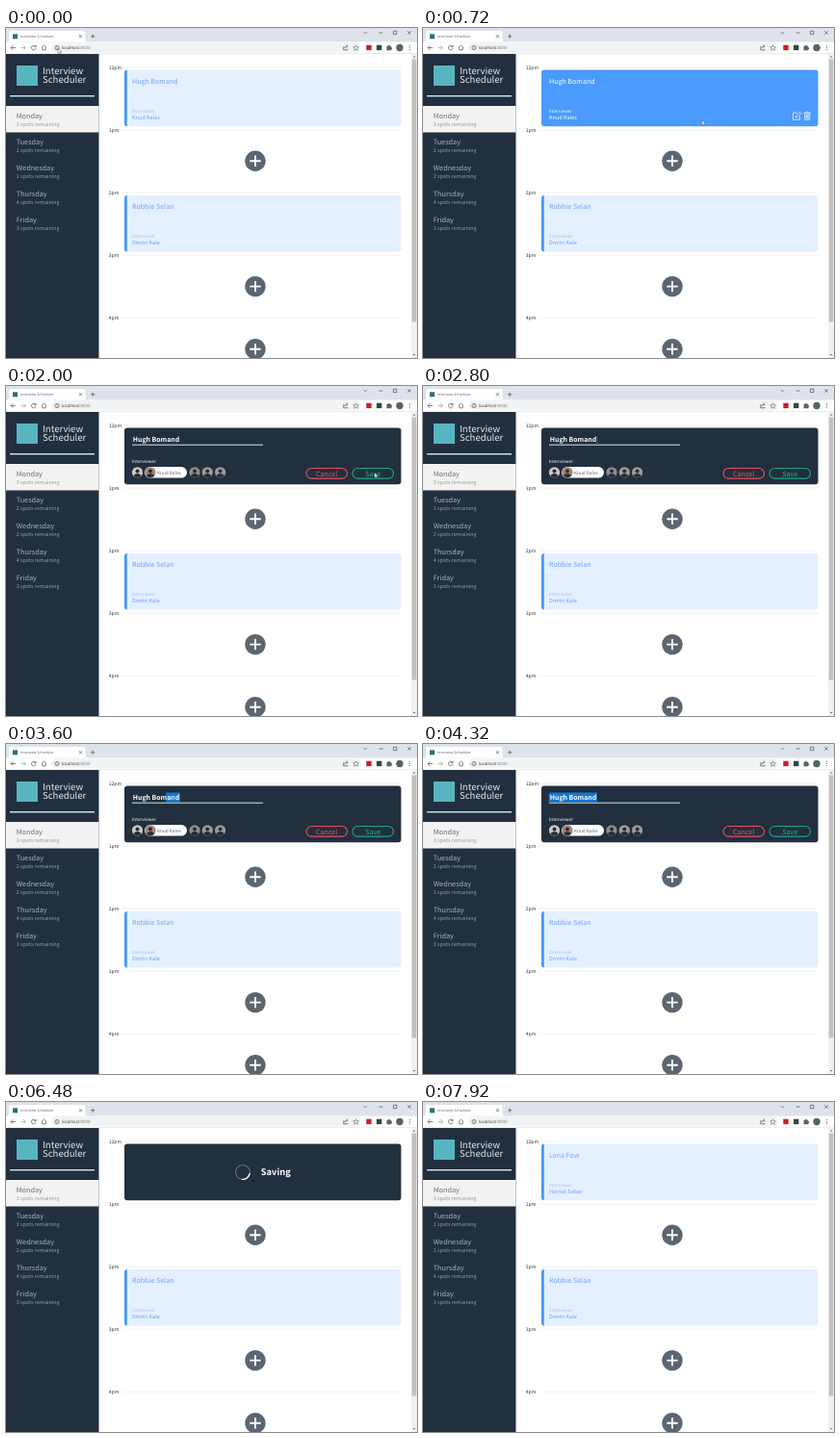
Animation, 427 px wide and 343 px high, one loop 8 s. Source, as an HTML page:

```html
<!DOCTYPE html>
<html lang="en">
<head>
<meta charset="utf-8">
<title>Interview Scheduler</title>
<style>
@property --f { syntax: '<integer>'; inherits: true; initial-value: 0; }
html, body { margin: 0; width: 100%; height: 100%; overflow: hidden; background: #fff; }
svg {
  display: block; width: 100%; height: 100%;
  font-family: "Noto Sans CJK JP", "Noto Sans CJK SC", "Noto Sans", sans-serif;
  text-rendering: geometricPrecision;
  animation: tick 8s steps(100) infinite;
}
text { white-space: pre; }

/* --f counts 80 ms steps; .on shows an element from step --a up to --b */
@keyframes tick { from { --f: 0; } to { --f: 100; } }
.on {
  --v: min(clamp(0, var(--f) - var(--a) + 1, 1), clamp(0, var(--b) - var(--f), 1));
  opacity: var(--v);
}
tspan.on { opacity: 1; fill-opacity: var(--v); }

.ui { font-family: "Open Sans", "Noto Sans", sans-serif; }
.line { fill: none; stroke: #5f6368; stroke-width: .8; }
.logo { font-size: 9.6px; font-weight: 300; fill: #e3e7ec; }
.day { font-size: 7.3px; fill: #a5b1c2; }
.spots { font-size: 5.45px; fill: #8e9bad; }
.now .day { fill: #6b7078; }
.now .spots { fill: #999ca1; }
.hour { font-size: 5px; fill: #333; }
.rule { stroke: #efefef; stroke-width: .8; }
.name { font-size: 7.1px; fill: #75a3f6; }
.label { font-size: 4.5px; fill: #a9bbfa; }
.who { font-size: 5.55px; fill: #6c9dfa; }
.hot text { fill: #fff; }
.icon { fill: none; stroke: #e8f2ff; stroke-width: .8; stroke-linejoin: round; stroke-linecap: round; }
.dark { fill: #222f3e; }
.input { font-size: 6.9px; font-weight: 700; fill: #fff; }
.pick { font-size: 4.75px; fill: #666; }
.btn { font-size: 7.1px; text-anchor: middle; }
.btn rect { fill: none; stroke-width: 1.1; }
.red text { fill: #f0525c; } .red rect { stroke: #e8505b; }
.green text { fill: #1fb894; } .green rect { stroke: #1aa886; }

.select { transform-origin: 181px 55px; animation: drag 8s steps(1) infinite; }
@keyframes drag {
  0% { transform: scaleX(0); } 45% { transform: scaleX(.3); }
  46% { transform: scaleX(.6); } 47% { transform: scaleX(.85); }
  48%, 100% { transform: scaleX(1); }
}
.spin { transform: translate(246px, 73px) rotate(calc(var(--f) * 29deg)); }
.cursor { animation: move 8s infinite ease-in-out; }
@keyframes move {
  0%, 2% { transform: translate(54px, 21px); }
  10%, 15% { transform: translate(297px, 98px); }
  20%, 24% { transform: translate(388px, 91px); }
  33%, 44% { transform: translate(181px, 56px); }
  48%, 62% { transform: translate(131px, 56px); }
  67%, 71% { transform: translate(140px, 90px); }
  76%, 100% { transform: translate(381px, 91px); }
}
</style>
</head>
<body>
<svg viewBox="0 0 427 343" preserveAspectRatio="none">
<defs>
  <g id="plus">
    <circle r="10.7" fill="#5c6670"/>
    <path d="M-5.7 0H5.7M0 -5.7V5.7" stroke="#fff" stroke-width="1.9"/>
  </g>
  <g id="face">
    <circle r="5.6" fill="currentColor"/>
    <g fill="#2b2d31">
      <circle cy="-1.2" r="2"/>
      <path d="M-4 3.8C-3.4 .4 3.4 .4 4 3.8A5.6 5.6 0 0 1 -4 3.8Z"/>
    </g>
  </g>
  <g id="pale">
    <path d="M123 46.5a3 3 0 0 1 3-3H407.5a3 3 0 0 1 3 3V99.2a3 3 0 0 1-3 3H126a3 3 0 0 1-3-3Z" fill="#e4f0fe"/>
    <path d="M125.8 43.5a2.8 3 0 0 0-2.8 3V99.2a2.8 3 0 0 0 2.8 3Z" fill="#4499f8"/>
  </g>
  <rect id="panel" x="123" y="43.5" width="287.5" height="58.7" rx="3"/>
</defs>

<rect width="427" height="343" fill="#fff"/>

<!-- browser frame -->
<g class="ui">
  <rect width="427" height="14.5" fill="#dee2ea"/>
  <path d="M1 14.5q2 0 2-2V5q0-2 2-2H80.500q2 0 2 2v7.500q0 2 2 2Z" fill="#fff"/>
  <rect x="7" y="6.300" width="5" height="5" fill="#2d6f7c"/>
  <text x="15" y="10.200" font-size="3.800" fill="#6a6470">Interview Scheduler</text>
  <g class="line">
    <path d="M76 7.200l3 3m0-3l-3 3M88 8.700h4.400m-2.200-2.200v4.400"/>
    <path d="M371.800 4.200l1.600 1.600 1.600-1.600M387.500 5h4M402.500 3.200h3.400v3.400h-3.400ZM417.300 3.200l3.400 3.400m0-3.400l-3.400 3.400"/>
    <path d="M10 20.500H5m2.300-2.300L5 20.500l2.300 2.300"/>
    <path d="M15.500 20.500h5m-2.300-2.300l2.300 2.300-2.300 2.300" stroke="#a9abaf"/>
    <path d="M30.700 19.200A2.300 2.300 0 1 0 31 21M31.100 17.700v1.900h-1.900"/>
    <path d="M37 20.300l2.500-2.300 2.500 2.300M37.800 20v2.800h3.400V20"/>
  </g>
  <rect x="47" y="15.300" width="322" height="10.300" rx="5.100" fill="#f1f3f4"/>
  <g class="line">
    <circle cx="53" cy="20.500" r="2.100"/>
    <path d="M53 20.200v1.400M53 19v.5" stroke-width=".6"/>
    <path d="M351.500 19.500h-.8v3.300h4.300v-1M352 21.300q.3-2.400 3-2.500m-1.300-1.300l1.400 1.300-1.400 1.300"/>
    <path d="M363.500 17.800l.8 1.800 2 .2-1.500 1.300.5 2-1.800-1-1.800 1 .5-2-1.500-1.300 2-.2Z" stroke-width=".6"/>
  </g>
  <text x="58" y="22.100" font-size="4.400" fill="#303236">localhost<tspan fill="#777b80">:8000</tspan></text>
  <rect x="374.300" y="17.700" width="5.400" height="5.400" fill="#c8202b"/>
  <rect x="385" y="17.700" width="5.400" height="5.400" fill="#31473c"/>
  <path d="M395.500 18.800h1.400a1 1 0 0 1 2 0h1.400v1.500a1 1 0 0 1 0 2v1h-4.800Z" fill="#5f6368"/>
  <circle cx="409" cy="20.500" r="3.700" fill="#52685a"/>
  <g fill="#5f6368"><circle cx="419.500" cy="18.500" r=".6"/><circle cx="419.500" cy="20.500" r=".6"/><circle cx="419.500" cy="22.500" r=".6"/></g>
  <path d="M0 26.600H427" stroke="#dcdee1" stroke-width=".6"/>
</g>

<!-- scrollbar -->
<rect x="421" y="27" width="6" height="316" fill="#f1f1f1"/>
<rect x="421.700" y="32.500" width="4.600" height="273" fill="#c1c1c1"/>
<path d="M422.700 30.500l1.400-1.600 1.400 1.600ZM422.700 339l1.400 1.600 1.400-1.600Z" fill="#666"/>

<!-- sidebar -->
<rect y="27" width="96.500" height="316" class="dark"/>
<rect x="11" y="39" width="22" height="21" fill="#58b5bf"/>
<g class="logo"><text x="38" y="48.400">Interview</text><text x="38" y="57.400">Scheduler</text></g>
<rect x="4" y="70" width="88" height="1.400" fill="#c7ecee"/>
<rect y="81" width="96.500" height="27.500" fill="#f2f2f2"/>
<g class="now"><text class="day" x="10.700" y="94.200">Monday</text><text class="spots" x="10.700" y="102">3 spots remaining</text></g>
<text class="day" x="10.700" y="121">Tuesday</text><text class="spots" x="10.700" y="128.800">2 spots remaining</text>
<text class="day" x="10.700" y="147.900">Wednesday</text><text class="spots" x="10.700" y="155.700">2 spots remaining</text>
<text class="day" x="10.700" y="174.800">Thursday</text><text class="spots" x="10.700" y="182.600">4 spots remaining</text>
<text class="day" x="10.700" y="201.700">Friday</text><text class="spots" x="10.700" y="209.500">3 spots remaining</text>

<!-- schedule -->
<path class="rule" d="M121 41H410.500M121 106H410.500M121 171H410.500M121 236.300H410.500M121 301.300H410.500"/>
<g class="hour">
  <text x="106.800" y="42.600">12pm</text><text x="106.800" y="107.600">1pm</text><text x="106.800" y="172.700">2pm</text>
  <text x="106.800" y="237.900">3pm</text><text x="106.800" y="303">4pm</text>
</g>
<use href="#plus" x="259" y="138.300"/>
<use href="#plus" x="259" y="268.600"/>
<use href="#plus" x="259" y="333.700"/>
<use href="#pale" y="130.400"/>
<text class="name" x="131" y="187.700">Robbie Selan</text>
<text class="label" x="131" y="218">Interviewer</text>
<text class="who" x="131" y="225.200">Dmitri Kale</text>

<!-- booked -->
<g class="on" style="--a:0;--b:6">
  <use href="#pale"/>
  <text class="name" x="131" y="57.600">Hugh Bomand</text>
  <text class="label" x="131" y="87.700">Interviewer</text>
  <text class="who" x="131" y="95">Knud Rales</text>
</g>

<!-- hovered -->
<g class="on hot" style="--a:6;--b:23">
  <use href="#panel" fill="#4a9bfb"/>
  <text class="name" x="131" y="57.600">Hugh Bomand</text>
  <text class="label" x="131" y="87.700">Interviewer</text>
  <text class="who" x="131" y="95">Knud Rales</text>
  <g class="icon">
    <path d="M388 88h-3.500v7.300h7V92M387.300 92.800l.4-2 3.700-3.600 1.500 1.500-3.700 3.700Z"/>
    <path d="M395.800 88.300h6.800M398 88.200l.5-1.200h1.400l.5 1.200M396.500 88.500l.4 6.900h4.600l.4-6.900M398.200 90v4M399.200 90v4M400.200 90v4"/>
  </g>
</g>

<!-- edit form -->
<g class="on" style="--a:23;--b:78">
  <use href="#panel" class="dark"/>
  <rect class="on" style="--a:45;--b:56" x="131.300" y="50.500" width="0" height="0"/>
  <g class="on" style="--a:45;--b:56"><rect class="select" x="131.300" y="50.500" width="49.700" height="9.600" fill="#0f78d8"/></g>
  <text class="input on" style="--a:23;--b:56" x="131.800" y="58.400">Hugh Bomand</text>
  <text class="input" x="131.500" y="58.400" style="--b:78"><tspan class="on" style="--a:56">L</tspan><tspan class="on" style="--a:57">e</tspan><tspan class="on" style="--a:58">n</tspan><tspan class="on" style="--a:59">a</tspan><tspan class="on" style="--a:60"> </tspan><tspan class="on" style="--a:61">F</tspan><tspan class="on" style="--a:62">o</tspan><tspan class="on" style="--a:63">w</tspan></text>
  <path d="M131 61.200H267" stroke="#c7ecee" stroke-width="1"/>
  <text x="131" y="80.300" font-size="4.700" fill="#fff">Interviewer</text>

  <g class="on" style="--a:23;--b:69">
    <use href="#face" x="136.500" y="89.800" color="#c9c9c9"/>
    <rect x="144" y="84" width="44" height="11.600" rx="5.800" fill="#fff"/>
    <use href="#face" x="150" y="89.800" color="#a58478"/>
    <text class="pick" x="157" y="91.500">Knud Rales</text>
    <use href="#face" x="196" y="89.800" color="#8b8d90"/>
    <use href="#face" x="209.300" y="89.800" color="#a09c98"/>
    <use href="#face" x="222.600" y="89.800" color="#9b9da0"/>
  </g>
  <g class="on" style="--a:69;--b:78">
    <rect x="131" y="84" width="48.300" height="11.600" rx="5.800" fill="#fff"/>
    <use href="#face" x="137" y="89.800" color="#c9c9c9"/>
    <text class="pick" x="144.800" y="91.500">Harriet Sabar</text>
    <use href="#face" x="187" y="89.800" color="#a58478"/>
    <use href="#face" x="200.300" y="89.800" color="#8b8d90"/>
    <use href="#face" x="213.600" y="89.800" color="#a09c98"/>
    <use href="#face" x="226.900" y="89.800" color="#9b9da0"/>
  </g>

  <g class="btn red"><rect x="312" y="85.500" width="42.500" height="10.600" rx="5.300"/><text x="333.200" y="93.500">Cancel</text></g>
  <g class="btn green"><rect x="360" y="85.500" width="42.500" height="10.600" rx="5.300"/><text x="381.200" y="93.500">Save</text></g>
</g>

<!-- saving -->
<g class="on" style="--a:78;--b:90">
  <use href="#panel" class="dark"/>
  <g class="spin" fill="none" stroke-width="1.300">
    <circle r="7.400" stroke="#5a6571"/>
    <path d="M-7.400 0A7.400 7.400 0 0 1 0 -7.400" stroke="#fff"/>
  </g>
  <text x="264.800" y="76.400" font-size="9.300" font-weight="700" fill="#fff">Saving</text>
</g>

<!-- saved -->
<g class="on" style="--a:90;--b:100">
  <use href="#pale"/>
  <text class="name" x="131" y="57.600">Lena Fow</text>
  <text class="label" x="131" y="87.700">Interviewer</text>
  <text class="who" x="131" y="95">Harriet Sabar</text>
</g>

<!-- pointer: arrow, hand, text bar -->
<g class="cursor">
  <g fill="#fff" stroke="#222" stroke-width=".4">
    <path id="arrow" class="on" style="--a:0;--b:19" d="M0 0V5.400L1.300 4.200 2.200 6.200 3.100 5.800 2.200 3.900H3.900Z"/>
    <path class="on" style="--a:24;--b:30" d="M0 0V5.400L1.300 4.200 2.200 6.200 3.100 5.800 2.200 3.900H3.900Z"/>
    <path class="on" style="--a:72;--b:75" d="M0 0V5.400L1.300 4.200 2.200 6.200 3.100 5.800 2.200 3.900H3.900Z"/>
    <path class="on" style="--a:19;--b:24" d="M-.6 0h1.200V2.300L3.200 2.900V4.600L2.500 6.400H-.6L-2.200 3.700-1.600 3.200-.6 4Z"/>
    <path class="on" style="--a:64;--b:72" d="M-.6 0h1.200V2.300L3.200 2.900V4.600L2.500 6.400H-.6L-2.200 3.700-1.600 3.200-.6 4Z"/>
    <path class="on" style="--a:75;--b:78" d="M-.6 0h1.200V2.300L3.200 2.900V4.600L2.500 6.400H-.6L-2.200 3.700-1.600 3.200-.6 4Z"/>
  </g>
  <path class="on" style="--a:30;--b:56" d="M-.9 -3H.9M0 -3V3M-.9 3H.9" fill="none" stroke="#6d7782" stroke-width=".5"/>
</g>
</svg>
</body>
</html>
```
